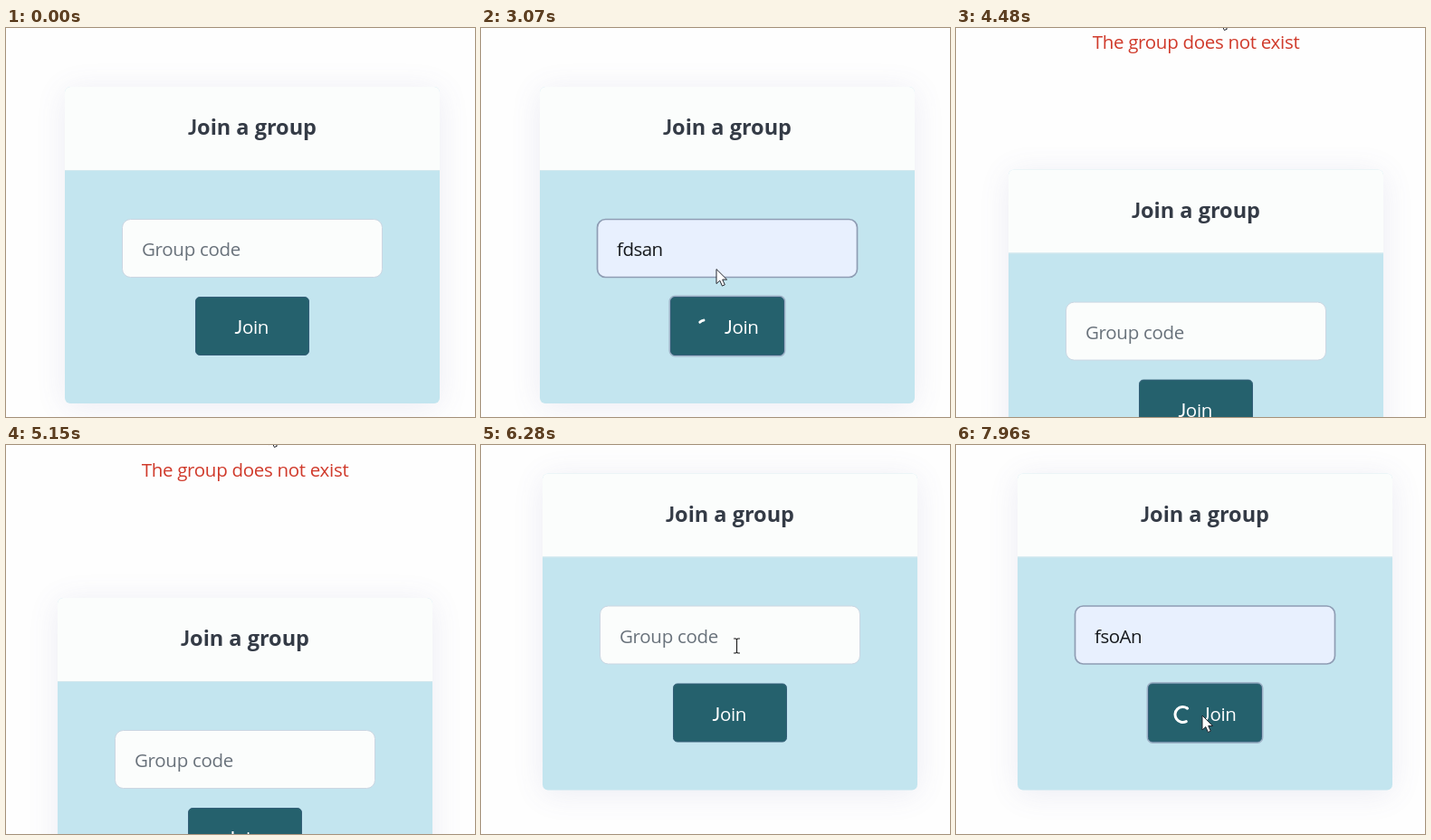
An HTML page for the animation above (8 s loop, 518 px wide and 430 px high).

```html
<!DOCTYPE html>
<html lang="en">
<head>
<meta charset="utf-8">
<title>Join a group</title>
<style>
  html, body { margin: 0; width: 100%; height: 100%; overflow: hidden; background: #fefefe; }
  svg { display: block; width: 518px; height: 430px; }
  text { font: 20.5px "Open Sans", "Noto Sans", sans-serif; letter-spacing: -.3px; white-space: pre; }
  .j { font-family: Lato, sans-serif; }
  #title { font-size: 23.5px; font-weight: 700; letter-spacing: 0; fill: #343b46; }
  #value { fill: #15181c; letter-spacing: -.55px; }
  #preview { font: 13.33px "Liberation Sans", Arial, sans-serif; letter-spacing: 0; fill: #222; }
  #menu text { font: 500 13px Roboto, sans-serif; letter-spacing: 0; fill: #2b2a33; }
</style>
</head>
<body>
<svg viewBox="0 0 518 430">
  <defs>
    <filter id="soft" x="-30%" y="-30%" width="160%" height="160%"><feGaussianBlur stdDeviation="17"/></filter>
    <filter id="near" x="-10%" y="-20%" width="120%" height="150%"><feGaussianBlur stdDeviation="2"/></filter>
  </defs>
  <rect width="518" height="430" fill="#fefefe"/>
  <g id="page">
    <rect x="65" y="69" width="414" height="350" rx="8" fill="#5a5aa0" opacity=".11" filter="url(#soft)"/>
    <text id="error" x="272" y="-69" text-anchor="middle" fill="#d03a2b">The group does not exist</text>
    <rect x="65" y="65" width="414" height="350" rx="6" fill="#c3e5ef"/>
    <path d="M65 157V71a6 6 0 0 1 6-6H473a6 6 0 0 1 6 6V157Z" fill="#fbfdfc"/>
    <path d="M65 157.5H479" stroke="#d3e8ee"/>
    <text id="title" x="272" y="118" text-anchor="middle"><tspan class="j">J</tspan>oin a group</text>

    <rect id="field" x="128.5" y="211.5" width="287" height="64" rx="9"/>
    <text id="hint" x="150" y="252" fill="#69727b">Group code</text>
    <text id="value" x="150" y="252"></text>
    <text id="preview" x="150" y="252"></text>
    <path id="caret" d="M0 229.5V257" stroke="#222"/>

    <rect id="ring" x="208.3" y="296.3" width="127.4" height="66.4" rx="6" fill="none" stroke="#9fb3c8" stroke-width="1.6"/>
    <rect x="209.5" y="297.5" width="125" height="64" rx="4.5" fill="#25616d" stroke="#345f78"/>
    <path id="spin" fill="none" stroke="#fff" stroke-width="3" stroke-linecap="round"/>
    <text id="label" x="252.5" y="338" fill="#fff"><tspan class="j">J</tspan>oin</text>

    <g id="menu">
      <rect x="227" y="288" width="156" height="80" rx="7" fill="#205060" opacity=".4" filter="url(#near)"/>
      <path d="M239 287L248 278L257 287Z" fill="#fffafe"/>
      <rect x="227" y="286" width="156" height="80" rx="7" fill="#fffafe"/>
      <g id="row">
        <rect x="231" y="290" width="148" height="36" rx="4" fill="#f2eef1"/>
        <path d="M357 304L365 312M365 304L357 312" stroke="#3a3944" stroke-width="1.7"/>
      </g>
      <text x="239" y="313">fdsan</text>
      <text x="239" y="349">fsoAn</text>
    </g>
  </g>
  <path id="edge" d="M0 .5H518" stroke="#dcdce0"/>
  <path id="arrow" d="M0 0V16L3.8 12.6L6.4 18.5L9.3 17.2L6.7 11.5H11.6Z" fill="#fff" stroke="#23262e" stroke-linejoin="round"/>
  <path id="beam" d="M-3.5 -8H-1L0 -7L1 -8H3.5M0 -7V7M-3.5 8H-1L0 7L1 8H3.5" fill="none" stroke="#222" stroke-width="1.2"/>
</svg>
<script>
const LOOP = 8000;
const $ = id => document.getElementById(id);
const set = (id, attrs) => { for (const k in attrs) $(id).setAttribute(k, attrs[k]); };
const show = (id, on) => set(id, { display: on ? "inline" : "none" });
const clamp = v => Math.min(1, Math.max(0, v));
const smooth = v => { v = clamp(v); return v * v * (3 - 2 * v); };
const between = (t, a, b) => t >= a && t < b;

// keys: [time, x, y]
const panKeys = [
  [4010, 0, 0], [4480, -7, 91.5], [4680, -8, 104],
  [5150, -8, 104], [5480, 8, 18], [5810, 3, -33.5]
];
const mouseKeys = [
  [190, 465, 422], [420, 380, 330], [760, 284, 250], [990, 282, 248],
  [1060, 282, 248], [1320, 281.5, 294], [1730, 284, 303],
  [1930, 284, 303], [2300, 276, 318], [2730, 270, 322],
  [2850, 270, 322], [3070, 260, 267], [3250, 270, 110], [3540, 290, -16],
  [6080, 290, -16], [6280, 282.5, 222],
  [6600, 282.5, 222], [6860, 283, 268], [7080, 284, 303], [7220, 283, 305],
  [7300, 283, 305], [7520, 272, 299]
];

// Monotone cubic interpolation: holds stay still, moves run through each key.
function track(keys, t, c) {
  const n = keys.length - 1;
  if (t <= keys[0][0]) return keys[0][c];
  if (t >= keys[n][0]) return keys[n][c];
  let i = 0;
  while (keys[i + 1][0] <= t) i++;
  const slope = k => k < 0 || k >= n ? 0 : (keys[k + 1][c] - keys[k][c]) / (keys[k + 1][0] - keys[k][0]);
  const tangent = k => {
    const a = slope(k - 1), b = slope(k);
    return a * b > 0 ? 2 * a * b / (a + b) : 0;
  };
  const h = keys[i + 1][0] - keys[i][0], u = (t - keys[i][0]) / h, u2 = u * u, u3 = u2 * u;
  return (2 * u3 - 3 * u2 + 1) * keys[i][c] + (u3 - 2 * u2 + u) * h * tangent(i)
    + (3 * u2 - 2 * u3) * keys[i + 1][c] + (u3 - u2) * h * tangent(i + 1);
}

// The two attempts at joining.
const tries = [
  { from: 0, focus: 850, open: 920, pick: 1930, text: "fdsan", end: 202, press: 2800, load: 2980, base: 212, done: 3610 },
  { from: 3610, focus: 6480, open: 6550, pick: 7280, text: "fsoAn", end: 205, press: 7500, load: 7540, base: -12, done: LOOP }
];

function arc(start, sweep) {
  const p = a => {
    const r = a * Math.PI / 180;
    return (247.5 + 8.5 * Math.cos(r)).toFixed(2) + " " + (331.5 + 8.5 * Math.sin(r)).toFixed(2);
  };
  return `M${p(start)}A8.5 8.5 0 ${sweep > 180 ? 1 : 0} 1 ${p(start + sweep)}`;
}

function draw(t) {
  const s = t < 3610 ? tries[0] : tries[1];
  const px = track(panKeys, t, 1), py = track(panKeys, t, 2);
  const mx = track(mouseKeys, t, 1), my = track(mouseKeys, t, 2);
  const lx = mx - px, ly = my - py;
  set("page", { transform: `translate(${px.toFixed(2)} ${py.toFixed(2)})` });

  const focused = between(t, s.focus, s.press);
  const picked = t >= s.pick;
  const pressed = t >= s.press;
  const open = between(t, s.open, s.pick);
  const row = !open || ly < 290 ? -1 : ly < 326 ? 0 : 1;

  const grow = focused ? smooth((t - s.focus) / 120) : 0;
  set("field", {
    x: 128.5 - .5 * grow, y: 211.5 - .5 * grow,
    width: 287 + grow, height: 64 + grow,
    fill: picked ? "#e8f0fe" : focused ? "#fff" : "#fbfdfc",
    stroke: focused ? "#535f80" : pressed ? "#8f9db4" : "#cbd6e2",
    "stroke-width": focused ? 1 + 1.4 * grow : pressed ? 1.7 : 1
  });
  show("hint", !picked && row < 0);
  $("value").textContent = picked ? s.text : "";
  $("preview").textContent = row < 0 ? "" : tries[row].text;
  const since = t - (picked ? s.pick : s.focus);
  show("caret", focused && since % 1060 < 530);
  set("caret", { transform: `translate(${picked ? s.end : 150.5} 0)` });

  show("menu", open);
  show("row", row >= 0);
  set("row", { transform: `translate(0 ${row * 36})` });

  const age = t - s.load;
  show("ring", pressed);
  show("spin", age >= 0);
  if (age >= 0) set("spin", { d: arc(s.base + .18 * age, 8 + 245 * smooth(age / 480)) });
  set("label", { x: 252.5 + 16.5 * smooth((t - s.press) / 140) });

  show("error", t >= 3610);
  show("edge", between(t, 5440, 5560));

  const inField = lx > 128 && lx < 416 && ly > 211 && ly < 276;
  const beam = inField && !pressed;
  show("beam", t >= 190 && beam);
  show("arrow", t >= 190 && !beam);
  const at = `translate(${mx.toFixed(2)} ${my.toFixed(2)})`;
  set("beam", { transform: at });
  set("arrow", { transform: at });
}

const begin = performance.now();
function tick() {
  draw((performance.now() - begin) % LOOP);
  requestAnimationFrame(tick);
}
draw(0);
requestAnimationFrame(tick);
</script>
</body>
</html>
```
